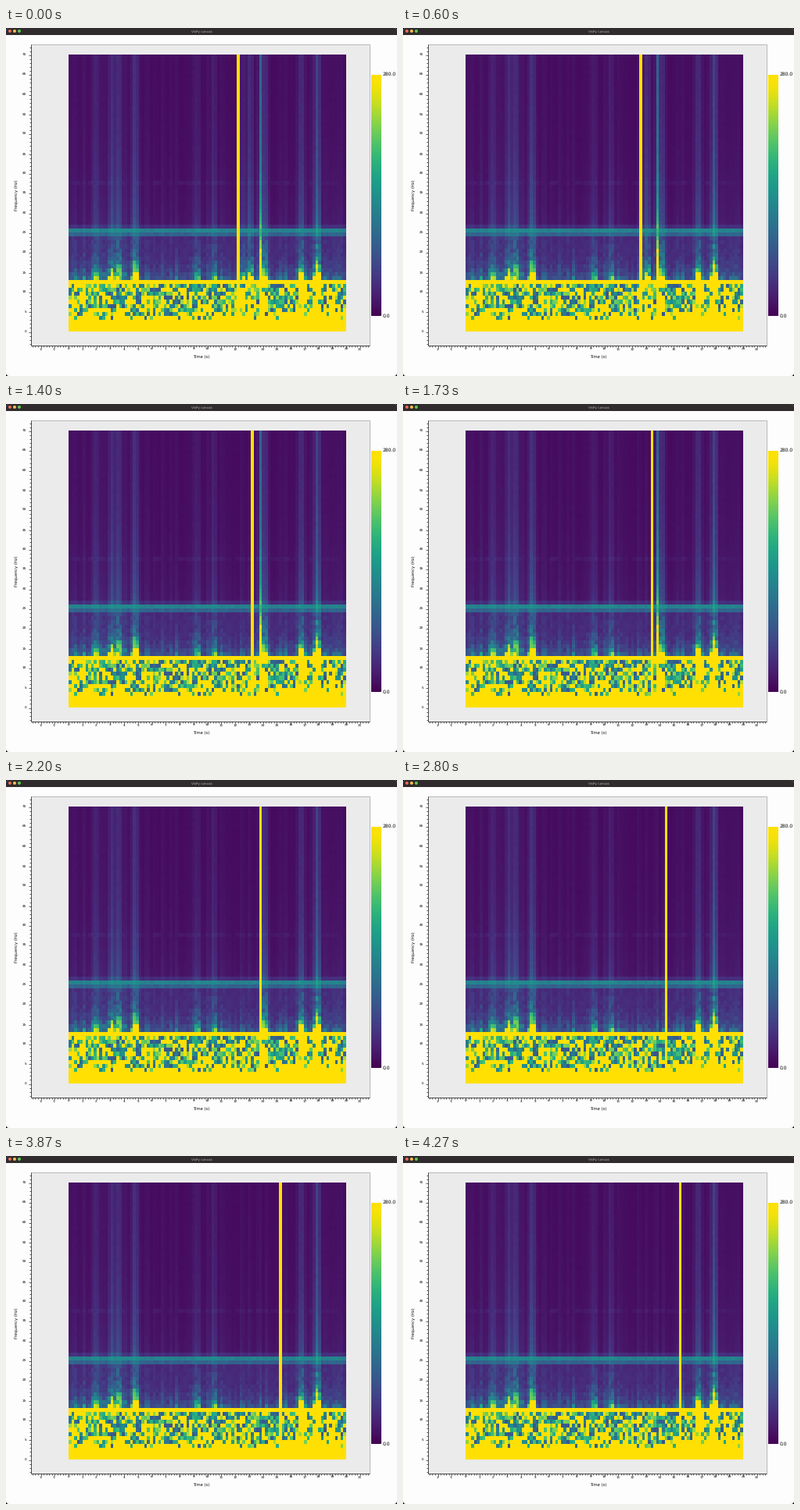
A matplotlib script for the animation above (4.34 s loop, 500 by 446 pixels).

```python
import numpy as np
import matplotlib.pyplot as plt
from matplotlib.animation import FuncAnimation
from matplotlib.collections import LineCollection
from matplotlib.colors import ListedColormap
from matplotlib.patches import Circle, FancyBboxPatch, Rectangle

W, H, DPI = 500, 446, 100
LOOP, STEP = 4340, 20              # ms
COLS, ROWS, SPAN = 99, 70, 20      # time bins, 1 Hz bins, seconds
LEFT, RIGHT, TOP, BOTTOM = 80, 435, 35, 389.5
FIRST = 60                         # sweep column at the start

plt.rcParams["font.family"] = "DejaVu Sans"
plt.rcParams["text.hinting"] = "none"

sec = (np.arange(COLS) + 0.5) * SPAN / COLS
freq = np.arange(ROWS)[:, None]


def streaks(peaks, width=0.22):
    """Sum of bursts over time, given as {second: strength}."""
    return sum(h * np.exp(-(((sec - t) / width) ** 2)) for t, h in peaks.items())


def spectrogram(bursts, seed=11):
    """Normalised power per frequency and time bin."""
    rng = np.random.default_rng(seed)
    gain = 0.4 + 0.5 * rng.random(COLS) + 0.2 * (sec < 5) + bursts
    noise = rng.random((ROWS, COLS))

    high = 0.01 + gain * (0.04 + 0.05 * np.exp((26 - freq) / 14))
    foot = 0.3 * gain ** 1.3 * np.exp((13 - freq) / 2.5)
    mid = 0.08 + (0.065 * gain + foot) * (0.6 + 0.8 * noise)
    v = np.where(freq > 25, high * (0.95 + 0.1 * noise), mid)
    v[37] += 0.03 * noise[37]
    v[26] += 0.06
    v[25] = 0.40 + 0.03 * gain + 0.05 * noise[25]
    v[24] = 0.26 + 0.05 * gain + 0.05 * noise[24]

    # speckled band between the solid 12 Hz line and the solid bottom
    busy = 0.38 + 0.22 * np.clip(bursts, 0, 3) * (sec > 12) + 0.12 * (sec > 16)
    chance = busy + np.clip((5 - freq) * 0.22, 0, 1)
    low = np.where(noise < chance, 1, 0.25 + 0.6 * rng.random((ROWS, COLS)))
    v = np.where(freq < 12, low, v)
    v[12] = v[:2] = 1
    return v


lasting = streaks({2: 1.2, 3.1: 1.8, 3.6: 1.8, 4.8: 2.2, 9.3: 0.8, 10.5: 1.2,
                   16.8: 2, 17.9: 4})
passing = streaks({12.6: 1, 13.1: 2, 14.2: 1.5}) + streaks({13.86: 6.5}, 0.14)
old, new = spectrogram(lasting + passing), spectrogram(lasting)

# viridis with a warmer yellow end
shades = plt.get_cmap("viridis")(np.linspace(0, 1, 256))
mix = np.linspace(0, 1, 256)[:, None] ** 10
cmap = ListedColormap(shades * (1 - mix) + np.array([1, 0.88, 0.01, 1]) * mix)

fig = plt.figure(figsize=(W / DPI, H / DPI), dpi=DPI, facecolor="black")
ax = fig.add_axes([0, 0, 1, 1])
ax.axis("off")


def label(x, y, s, size, ha="center", color="black", **kw):
    ax.text(x, y, s, fontsize=size * 72 / DPI, ha=ha, va="center", color=color, **kw)


def heatmap(data, x0, x1, y0, y1):
    return ax.imshow(data, cmap=cmap, vmin=0, vmax=1, origin="lower", aspect="auto",
                     interpolation="nearest", extent=(x0, x1, y0, y1), zorder=3)


def to_x(t):
    return LEFT + t * (RIGHT - LEFT) / SPAN


def to_y(f):
    return BOTTOM - f * (BOTTOM - TOP) / ROWS


# window
window = FancyBboxPatch((4, 4), W - 8, H - 8, boxstyle="round,pad=4,rounding_size=4",
                        fc="#fdfdfd", ec="none")
ax.add_patch(window)
bar = Rectangle((0, 0), W, 9, fc="#302c2d", ec="none")
ax.add_patch(bar)
bar.set_clip_path(window)
for x, color in zip((5, 11, 17), ("#ec6a5e", "#f4bf4f", "#61c554")):
    ax.add_patch(Circle((x, 4), 2, fc=color, ec="none"))
label(250.5, 4.2, "VisPy canvas", 4.15, color="#b9b6b6")

# panel and axes
X0, X1, Y0, Y1 = 32, 465, 21, 407
ax.add_patch(Rectangle((X0, Y0), X1 - X0, Y1 - Y0, fc="#ebebeb", ec="#adadad", lw=0.6))
ticks = [[(X0, Y0), (X0, Y1)], [(X0, Y1), (X1, Y1)]]
for f in range(-3, 73):
    ticks.append([(X0 - (3 if f % 5 == 0 else 2), to_y(f)), (X0, to_y(f))])
for i in range(-13, 109):
    ticks.append([(to_x(i / 5), Y1), (to_x(i / 5), Y1 + (3 if i % 5 == 0 else 2))])
ax.add_collection(LineCollection(ticks, colors="#222222", linewidths=0.5))
for f in range(0, 71, 5):
    label(26, to_y(f), str(f), 4.1, ha="right")
for t in range(-2, 22):
    label(to_x(t), 412, str(t), 4.1)
label(249.5, 421.5, "Time (s)", 5.2)
label(13.2, 214.5, "Frequency (Hz)", 5.2, rotation=90)

# colour bar
heatmap(np.linspace(0, 1, 256)[:, None], 467, 480, 369, 60)
label(481.7, 59.7, "280.0", 6, ha="left")
label(481.7, 369, "0.0", 6, ha="left")

image = heatmap(old, LEFT, RIGHT, BOTTOM, TOP)
ax.set_xlim(0, W)
ax.set_ylim(H, 0)


def update(i):
    # the sweep is refreshed 15 times a second and moves about 4 bins a second
    t = np.floor(i * STEP * 0.015) / 0.015
    head = FIRST + (int(0.004 * t + 0.1) if t >= 330 else 0)
    grid = np.where(np.arange(COLS) < head, new, old)
    grid[:, head] = 1
    image.set_data(grid)
    return [image]


anim = FuncAnimation(fig, update, frames=LOOP // STEP, interval=STEP,
                     repeat=True, repeat_delay=0, blit=False)
plt.show()
```
